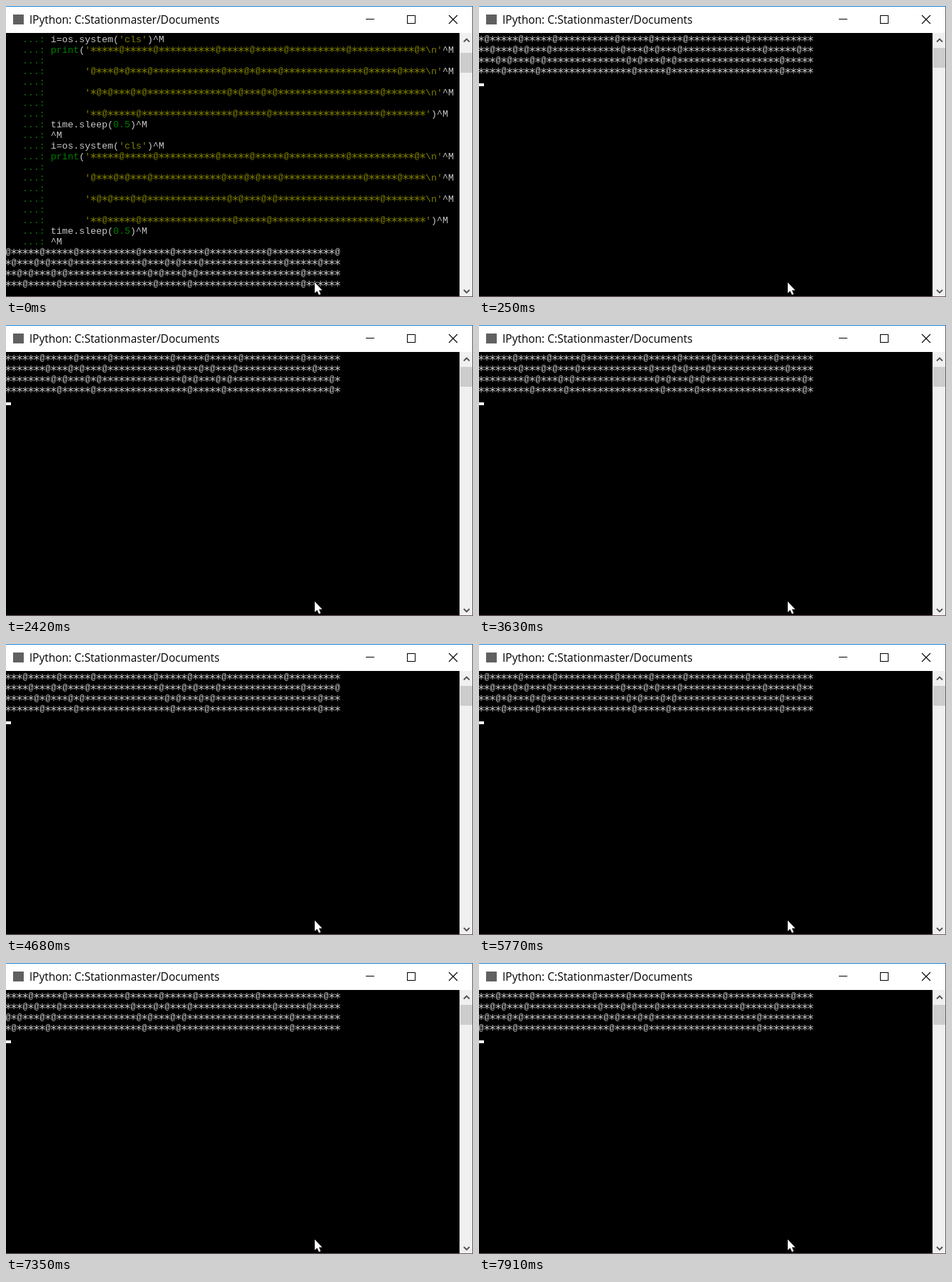
Recreate the animation shown at these times as an HTML page with a canvas. Size 658 px wide and 410 px high, loop 8 s.

```html
<!DOCTYPE html>
<html lang="en">
<head>
<meta charset="utf-8">
<title>Console</title>
<style>
html, body { margin: 0; width: 100%; height: 100%; overflow: hidden; background: #000; }
canvas { display: block; }
</style>
</head>
<body>
<canvas id="stage" width="658" height="410"></canvas>
<script>
const ctx = document.getElementById('stage').getContext('2d');
const GRAY = '#c8c8c8', GREEN = '#008000', OLIVE = '#808000';
const COLS = 59, LOOP = 8000;

// Banners are printed at a nearly even pace: [index, start] key points
const PACE = [[0, 250], [3, 2020], [4, 2420], [7, 4220], [8, 4680], [13, 7350]];

function bannerIndex(t) {
  let k = PACE.length - 2;
  while (k > 0 && t < PACE[k][1]) k--;
  const [i0, t0] = PACE[k], [i1, t1] = PACE[k + 1];
  return Math.floor(i0 + (i1 - i0) * (t - t0) / (t1 - t0) + 1e-6);
}

// Slide right to 7, then back left; the shift 5 is skipped both ways
function shiftAt(index) {
  const s = 7 - Math.abs(index - 5);
  return s < 6 ? s - 1 : s;
}

const inW = (c, r) => c >= 0 && c <= 12 && 3 - Math.abs(3 - c % 6) === r;
const inY = (c, r) => Math.abs(c - 6) === Math.max(0, 6 - 3 * r);

function bannerRow(r, shift) {
  const lag = shift > 5 && r > 0 ? 1 : 0;   // the Y trails on the far right
  let text = '';
  for (let x = 0; x < COLS; x++) {
    const c = x - shift;
    text += inW(c, r) || inW(c - 23, r) || inY(c - 46 + lag, r) ? '@' : '*';
  }
  return text;
}

function rect(x, y, w, h, color) {
  ctx.fillStyle = color;
  ctx.fillRect(x, y, w, h);
}

function stroke(color, width, ...lines) {
  ctx.strokeStyle = color;
  ctx.lineWidth = width;
  ctx.beginPath();
  for (const line of lines) line.forEach(([x, y], i) => i ? ctx.lineTo(x, y) : ctx.moveTo(x, y));
  ctx.stroke();
}

const FONTS = {
  '*': '17px "DejaVu Sans Mono", monospace',
  '@': '12px "Liberation Mono", monospace'
};

// Write text on the 8 x 15 character grid; banner signs are centred in their cell
function put(col, row, text, color = GRAY) {
  ctx.fillStyle = color;
  [...text].forEach((ch, i) => {
    const x = (col + i) * 8 + 3, y = 46 + row * 15;
    ctx.font = FONTS[ch] || '13.33px "Liberation Mono", monospace';
    let base = y + 5;
    if (FONTS[ch]) {
      const m = ctx.measureText(ch);
      base = y + 0.5 + (m.actualBoundingBoxAscent - m.actualBoundingBoxDescent) / 2;
    }
    ctx.fillText(ch, x, base);
  });
}

function banner(top, shift) {
  for (let r = 0; r < 4; r++) put(0, top + r, bannerRow(r, shift));
}

function codeBlock(top) {
  for (let r = 0; r < 10; r++) put(3, top + r, '...:', GREEN);
  put(8, top, 'i=os.system(');
  put(20, top, "'cls'", OLIVE);
  put(25, top, ')^M');
  put(8, top + 1, 'print', GREEN);
  put(13, top + 1, '(');
  for (let r = 0; r < 4; r++) {
    const y = top + 1 + r * 2, last = r === 3;
    put(14, y, "'" + bannerRow(r, -1) + (last ? "'" : "\\n'"), OLIVE);
    put(last ? 75 : 77, y, last ? ')^M' : '^M');
  }
  put(8, top + 8, 'time.sleep(');
  put(19, top + 8, '0.5', GREEN);
  put(22, top + 8, ')^M');
  put(8, top + 9, '^M');
}

function drawWindow(thumbY) {
  rect(0, 0, 658, 38, '#fff');
  rect(10, 12, 15, 14, '#606060');
  ctx.textAlign = 'left';
  ctx.fillStyle = '#000';
  ctx.font = '15.5px "Open Sans", "Noto Sans", sans-serif';
  ctx.fillText('IPython: C:Stationmaster/Documents', 33, 25);

  stroke('#000', 1, [[507, 18.5], [519, 18.5]]);
  ctx.strokeRect(565.5, 13.5, 11, 11);
  stroke('#000', 1.1, [[624, 13], [636, 25]], [[636, 13], [624, 25]]);

  rect(639, 38, 18, 371, '#f0f0f0');
  rect(640, thumbY, 17, 28, '#cdcdcd');
  stroke('#505050', 1.8, [[645, 50.5], [649, 46.5], [653, 50.5]], [[645, 400], [649, 404], [653, 400]]);

  rect(0, 409, 658, 1, '#6b5a66');
  rect(657, 0, 1, 410, '#6b5a66');
  rect(0, 0, 658, 1, '#1883d7');
}

function drawPointer() {
  const arrow = new Path2D('M435 389.5V404.5L438.4 401.4L441 407L443.4 406L440.9 400.4H445.5Z');
  stroke('#000', 1);
  ctx.stroke(arrow);
  ctx.fillStyle = '#fff';
  ctx.fill(arrow);
}

function draw(t) {
  rect(0, 0, 658, 410, '#000');
  ctx.textAlign = 'center';
  const index = bannerIndex(t), printed = index >= 0;
  if (printed) {
    banner(0, shiftAt(index));
    rect(0, 109, 7, 4, '#fff');
  } else {
    codeBlock(0);
    codeBlock(10);
    banner(20, 0);
  }
  drawWindow(printed ? 59 : 66);
  drawPointer();
}

const begin = performance.now();
function tick() {
  draw((performance.now() - begin) % LOOP);
  requestAnimationFrame(tick);
}
tick();
</script>
</body>
</html>
```
